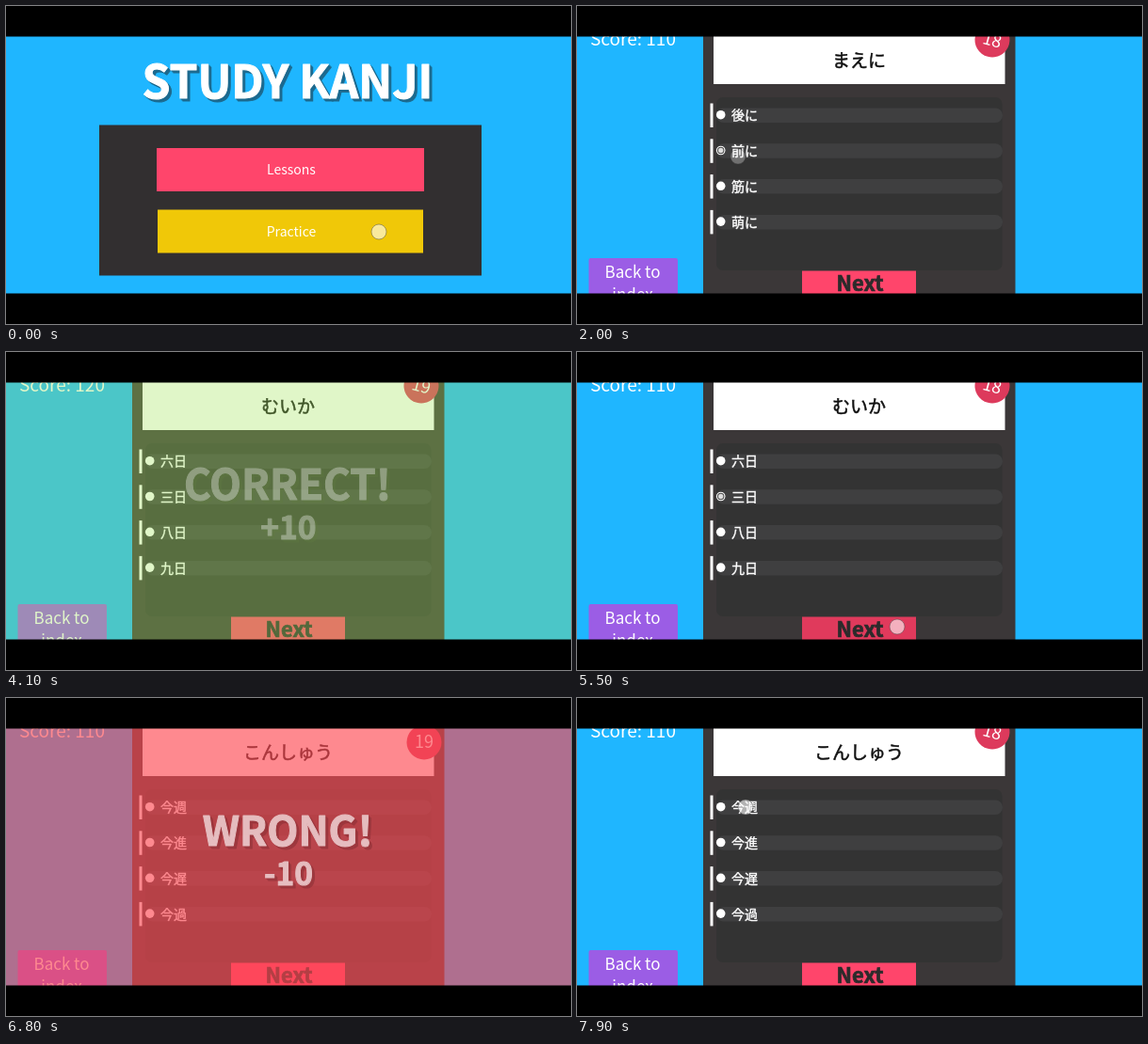
Recreate the animation shown at these times as an HTML page. Size 600 px wide and 338 px high, loop 8000 ms.

```html
<!DOCTYPE html>
<html lang="ja">
<head>
<meta charset="utf-8">
<title>Study Kanji</title>
<style>
  html, body { margin: 0; width: 100%; height: 100%; overflow: hidden; background: #000; }
  svg { display: block; width: 600px; height: 338px; }
  text { font-family: "Noto Sans CJK JP", "Noto Sans CJK", "Noto Sans", sans-serif; fill: #fff; }
  .mid { text-anchor: middle; }
  .bold { font-weight: 700; }
  .raised text { stroke-width: 1; stroke-linejoin: round; }
  .option { stroke: #fff; stroke-width: .4; }
  #word { fill: #111; stroke: #111; stroke-width: .5; }
</style>
</head>
<body>
<svg viewBox="0 0 600 338">
  <rect y="32" width="600" height="274" fill="#1fb6ff"/>

  <g id="menu">
    <g class="raised" data-text="STUDY KANJI" data-x="299" data-y="98" data-size="48" data-shade="#1d6a8f"></g>
    <rect x="99" y="126.500" width="406" height="160" fill="#322f30"/>
    <rect x="160" y="151" width="284" height="46" fill="#ff456b"/>
    <rect x="161" y="216.500" width="282" height="46" fill="#f0c808"/>
    <text class="mid" x="303" y="179" font-size="14">Lessons</text>
    <text class="mid" x="303" y="245" font-size="14">Practice</text>
  </g>

  <g id="quiz">
    <text id="score" x="14" y="42" font-size="19"></text>
    <rect x="12.500" y="268" width="94.500" height="60" rx="2" fill="#9b5de5"/>
    <text class="mid" x="59" y="289" font-size="17">Back to</text>
    <text class="mid" x="59" y="313" font-size="17">index</text>
    <rect x="134" y="32" width="331.500" height="274" fill="#3b3738"/>
    <rect x="145" y="30" width="309.500" height="53" fill="#fff"/>
    <text id="word" class="mid" x="299.500" y="65" font-size="19"></text>
    <rect x="148" y="97" width="303.500" height="184" rx="7" fill="#333"/>
    <g id="rows"></g>
    <rect id="next" x="239" y="281.500" width="121" height="30"/>
    <text class="mid bold" x="300.500" y="302.500" font-size="22" style="fill:#2b2b2b;stroke:#2b2b2b;stroke-width:.7">Next</text>
    <g id="badge">
      <circle r="18.500" fill="#dd3a5c"/>
      <text id="count" class="mid" y="6.500" font-size="18"></text>
    </g>
  </g>

  <circle id="touch" r="8" fill="#fff" fill-opacity=".6" stroke="#444" stroke-opacity=".45"/>

  <g id="correct">
    <rect y="32" width="600" height="274" fill="#a3e45a"/>
    <g class="raised" data-text="CORRECT!" data-x="299" data-y="157" data-size="44" data-shade="#617c41"></g>
    <g class="raised" data-text="+10" data-x="300" data-y="199" data-size="33.500" data-shade="#617c41"></g>
  </g>
  <g id="wrong">
    <rect y="32" width="600" height="274" fill="#fe4a53"/>
    <g class="raised" data-text="WRONG!" data-x="299" data-y="157" data-size="43" data-shade="#8f3238"></g>
    <g class="raised" data-text="-10" data-x="300" data-y="199" data-size="33.500" data-shade="#8f3238"></g>
  </g>

  <rect width="600" height="32.500"/>
  <rect y="305.500" width="600" height="32.500"/>
</svg>
<script>
const $ = id => document.getElementById(id);
const LOOP = 8000;

const questions = [
  { from: 0, word: 'まえに', options: ['後に', '前に', '筋に', '萌に'], pick: 1, pickAt: 1800, ticks: [700, 1700] },
  { from: 3200, word: 'むいか', options: ['六日', '三日', '八日', '九日'], pick: 1, pickAt: 4900, ticks: [3700, 4700] },
  { from: 6150, word: 'こんしゅう', options: ['今週', '今進', '今遅', '今過'], pick: 0, pickAt: LOOP, ticks: [6650, 7600] },
];

const touches = [
  { x: 396, y: 240, from: -100, to: 200 },
  { x: 171, y: 160, from: 1700, to: 2200, fade: 400 },
  { x: 340, y: 292, from: 2450, to: 2750 },
  { x: 171, y: 160, from: 4750, to: 5150 },
  { x: 340, y: 292, from: 5350, to: 5700 },
  { x: 179, y: 116, from: 7750, to: 8100 },
];

const ramp = (t, from, to) => Math.min(1, Math.max(0, (t - from) / (to - from)));
const between = (t, from, to) => t >= from && t < to;

// Extruded lettering: stacked shade copies under a white face.
for (const g of document.querySelectorAll('.raised')) {
  const { text, x, y, size, shade } = g.dataset;
  for (const d of [3, 2, 1, 0]) {
    const color = d ? shade : '#fff';
    g.innerHTML += `<text class="mid bold" x="${+x + d}" y="${+y + d}" font-size="${size}"
      style="fill:${color};stroke:${color}">${text}</text>`;
  }
}

$('rows').innerHTML = [0, 1, 2, 3].map(i => `
  <g transform="translate(0 ${116 + i * 37.8})">
    <rect x="148" y="-7.500" width="304" height="15.500" rx="7.700" fill="#3f3f40"/>
    <rect x="141.500" y="-12.500" width="3" height="25.500" fill="#fff"/>
    <circle cx="152.700" cy="-.3" r="4.800" fill="#fff"/>
    <g class="dot">
      <circle cx="152.700" cy="-.3" r="3.700" fill="#444"/>
      <circle cx="152.700" cy="-.3" r="2.700" fill="#ddd"/>
    </g>
    <text class="option" x="164" y="5.300" font-size="14"></text>
  </g>`).join('');
const dots = document.querySelectorAll('.dot');
const options = document.querySelectorAll('.option');

function drawQuiz(t) {
  const q = questions.findLast(q => t >= q.from);
  $('word').textContent = q.word;
  options.forEach((el, i) => el.textContent = q.options[i]);
  dots.forEach((el, i) => el.setAttribute('opacity', +(i === q.pick && t >= q.pickAt)));
  $('score').textContent = 'Score: ' + (between(t, 2600, 5450) ? 120 : 110);

  const passed = q.ticks.filter(tick => t >= tick);
  $('count').textContent = 20 - passed.length;
  // Each tick drops the badge and swings it back to its tilt.
  const swing = passed.length ? Math.sin(Math.PI * ramp(t, passed.at(-1), passed.at(-1) + 300)) : 0;
  $('badge').setAttribute('transform',
    `translate(${441 + 3 * swing} ${36 + 11 * swing}) rotate(${15 * (1 - swing)})`);

  const pressed = between(t, 2500, 2800) || between(t, 5400, 5700);
  $('next').setAttribute('fill', pressed ? '#e03a5c' : '#ff456b');
}

function drawTouch(t) {
  const touch = touches.find(p => between(t, p.from, p.to));
  $('touch').setAttribute('opacity', touch
    ? ramp(t, touch.from, touch.from + 80) * (1 - ramp(t, touch.to - (touch.fade || 100), touch.to))
    : 0);
  if (touch) $('touch').setAttribute('transform', `translate(${touch.x} ${touch.y})`);
}

// Backdrop and lettering fade as separate layers.
function drawVerdict(id, start, t) {
  const alpha = ramp(t, start, start + 450) * (1 - ramp(t, start + 1040, start + 1640));
  for (const layer of $(id).children) layer.setAttribute('opacity', alpha);
}

function draw(t) {
  const opened = ramp(t, 250, 550);
  $('menu').setAttribute('opacity', 1 - opened);
  $('quiz').setAttribute('opacity', opened);
  drawQuiz(t);
  drawTouch(t);
  drawVerdict('correct', 2660, t);
  drawVerdict('wrong', 5550, t);
}

const begin = performance.now();
function frame() {
  draw((performance.now() - begin) % LOOP);
  requestAnimationFrame(frame);
}
frame();
</script>
</body>
</html>
```
